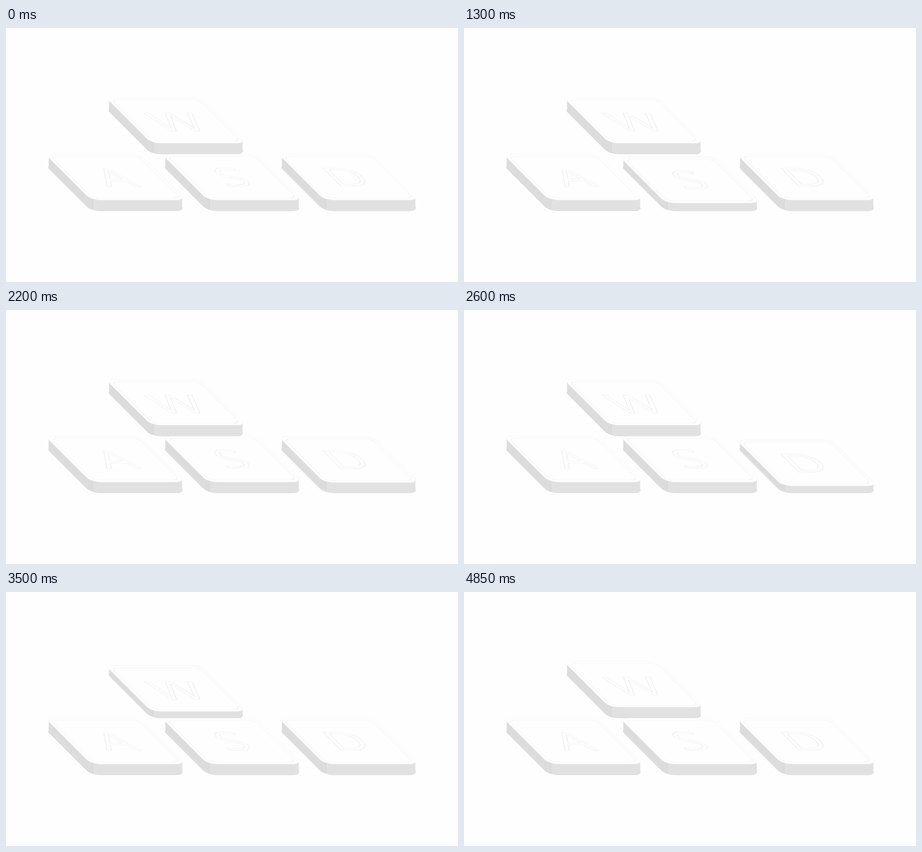
These frames come from a looping animation (998x561 px, 5050 ms). An HTML page:

```html
<!DOCTYPE html>
<html lang="en">
<head>
<meta charset="utf-8">
<title>WASD keys</title>
<style>
  html, body { margin: 0; width: 100%; height: 100%; overflow: hidden; background: #fefefe; }
  svg { display: block; width: 100%; height: 100%; }
  text {
    font: 400 56px "Open Sans", "Noto Sans", sans-serif;
    text-anchor: middle;
    fill: none;
    stroke: #e6e6e6;
    stroke-width: .9;
    vector-effect: non-scaling-stroke;
  }
  .edge { fill: none; stroke: #c6c6c6; }
  .press {
    animation: press 5050ms infinite cubic-bezier(.37, 0, .63, 1);
    animation-delay: calc(35ms + var(--i) * 1040ms);
  }
  @keyframes press {
    0%, 19.8%, 100% { transform: translateY(0); }
    7.13% { transform: translateY(9.4px); }
  }
</style>
</head>
<body>
<svg viewBox="0 0 998 561">
  <defs>
    <path id="slab" d="M20 0H188.8C199.8 0 213.3 4.5 218.8 10L300.3 91.5C305.8 97 301.3 101.5 290.3 101.5H121.5C110.5 101.5 97 97 91.5 91.5L10 10C4.5 4.5 9 0 20 0Z"/>
    <path id="wall" d="M7.6 5.5V29L302.7 119.5V96Z"/>
    <!-- resting silhouette: a pressed key sinks out of it at the bottom -->
    <clipPath id="hull">
      <use href="#slab"/>
      <use href="#wall"/>
      <use href="#slab" y="23.5"/>
    </clipPath>
    <linearGradient id="shade" gradientUnits="userSpaceOnUse" x1="0" x2="211" y1="0" y2="0">
      <stop offset=".5" stop-color="#dcdcdc"/>
      <stop offset=".5" stop-color="#e1e1e1"/>
    </linearGradient>
    <g id="body">
      <g fill="url(#shade)">
        <use href="#slab" y="23.5"/>
        <use href="#wall"/>
      </g>
      <path d="M105.5 99V125" stroke="#d2d2d2" stroke-width=".8"/>
      <use href="#slab" fill="#fff" stroke="#ececec" stroke-width=".8"/>
      <rect x="7" y="4.5" width="194.8" height="92.5" rx="16" ry="8" transform="skewX(45)"
            fill="#fefefe" stroke="#ebebeb" stroke-width=".7"/>
    </g>
  </defs>

  <g transform="translate(219.7 153)">
    <use class="edge" href="#slab" y="23.5"/>
    <g clip-path="url(#hull)"><g class="press" style="--i:3">
      <use href="#body"/>
      <text transform="matrix(2.12 0 1 1 177.8 74.5)">W</text>
    </g></g>
  </g>
  <g transform="translate(86.4 278.5)">
    <use class="edge" href="#slab" y="23.5"/>
    <g clip-path="url(#hull)"><g class="press" style="--i:0">
      <use href="#body"/>
      <text transform="matrix(2.12 0 1 1 173.9 71.5)">A</text>
    </g></g>
  </g>
  <g transform="translate(343.9 278.5)">
    <use class="edge" href="#slab" y="23.5"/>
    <g clip-path="url(#hull)"><g class="press" style="--i:1">
      <use href="#body"/>
      <text transform="matrix(2.12 0 1 1 174.6 71)">S</text>
    </g></g>
  </g>
  <g transform="translate(601.4 278.5)">
    <use class="edge" href="#slab" y="23.5"/>
    <g clip-path="url(#hull)"><g class="press" style="--i:2">
      <use href="#body"/>
      <text transform="matrix(2.12 0 1 1 170 71)">D</text>
    </g></g>
  </g>
</svg>
</body>
</html>
```
